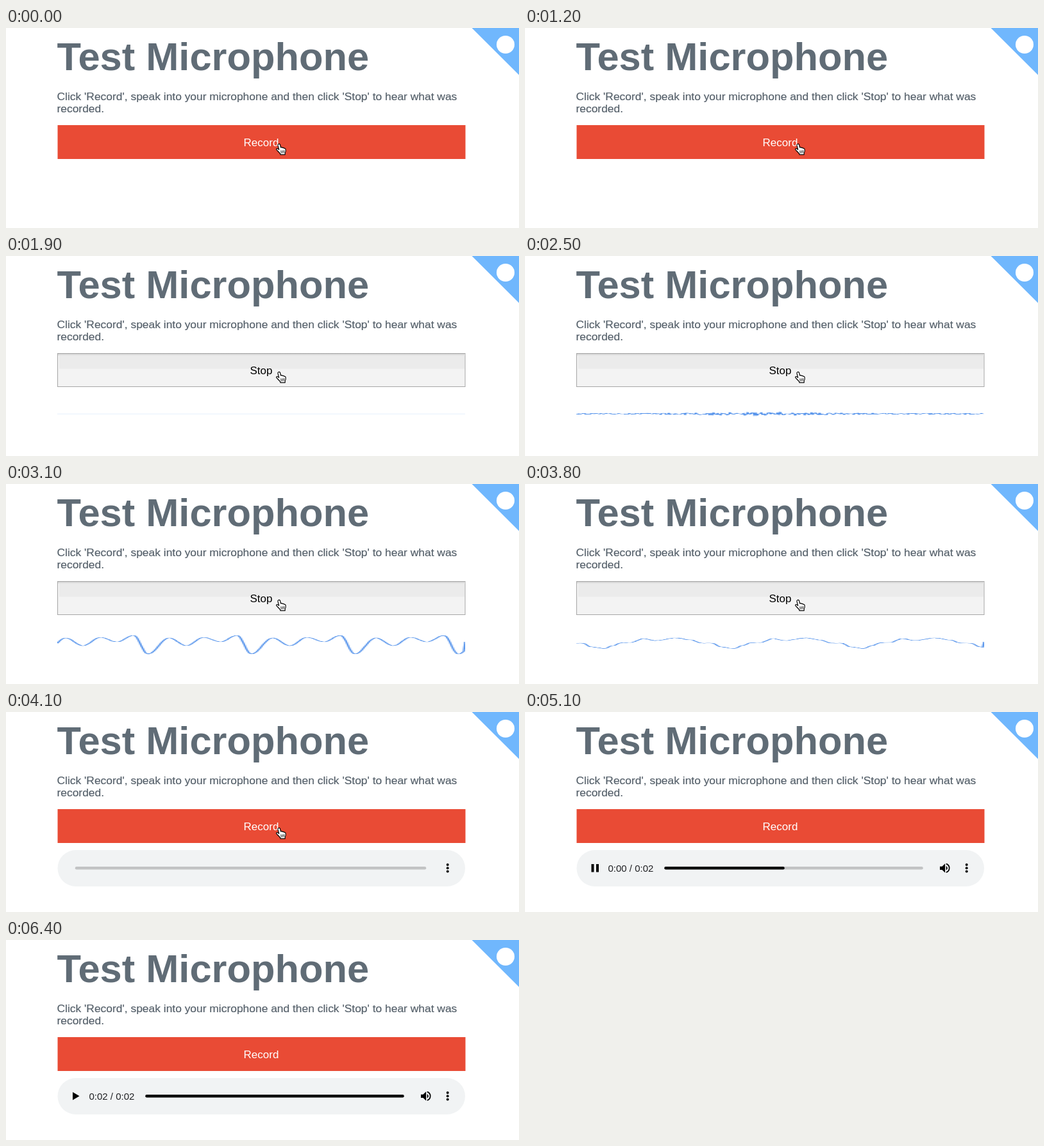
An HTML page with a canvas for the animation above (6500 ms loop, 800x313 px).

```html
<!DOCTYPE html>
<html lang="en">
<head>
<meta charset="utf-8">
<title>Test Microphone</title>
<style>
  html, body { margin: 0; width: 100%; height: 100%; overflow: hidden; background: #fff; }
  svg, canvas { position: absolute; }
  svg { left: 0; top: 0; }
  canvas { left: 80px; top: 219.5px; width: 636px; height: 54px; }
  text { font-family: "Liberation Sans", Arial, sans-serif; font-size: 17px; white-space: pre; }
  .heading { font-size: 61.4px; font-weight: bold; fill: #606c76; }
  .intro { font-size: 17.42px; fill: #56616b; stroke: #56616b; stroke-width: .2; }
  .track { stroke-width: 4.5; stroke-linecap: round; stroke: #c2c3c4; }
</style>
</head>
<body>
<svg width="800" height="313" viewBox="0 0 800 313">
  <defs>
    <linearGradient id="shade" x2="0" y2="1">
      <stop stop-color="#cfcfcf"/><stop offset="1" stop-color="#ebebeb"/>
    </linearGradient>
  </defs>
  <path d="M726.5 0H800V73.5Z" fill="#70b7fd"/>
  <circle cx="779" cy="26" r="14" fill="#fff"/>
  <text class="heading" x="79.5" y="66">Test Microphone</text>
  <text class="intro" x="79.5" y="113">Click 'Record', speak into your microphone and then click 'Stop' to hear what was</text>
  <text class="intro" x="79.5" y="132">recorded.</text>

  <g id="record">
    <rect x="80.5" y="152" width="636" height="53" fill="#e94b35"/>
    <text x="398" y="185" text-anchor="middle" fill="#fff">Record</text>
  </g>
  <g id="stop">
    <rect x="80.5" y="152.5" width="635.5" height="52" fill="#f3f3f3" stroke="#a6a6a6"/>
    <rect x="83" y="153" width="632" height="23.5" fill="#ebebeb"/>
    <rect x="81" y="153" width="634.5" height="3" fill="url(#shade)"/>
    <text x="398" y="185" text-anchor="middle" fill="#000">Stop</text>
  </g>

  <g id="player">
    <rect x="80.5" y="216" width="635.5" height="57" rx="28.5" fill="#f1f3f4"/>
    <g id="dots"><circle cx="688.7" cy="239" r="2"/><circle cx="688.7" cy="244.3" r="2"/><circle cx="688.7" cy="249.6" r="2"/></g>
    <path id="emptyTrack" class="track" d="M110 244.3H653"/>
    <g id="controls">
      <path id="playIcon" d="M104 238V250.5L114.5 244.3Z"/>
      <path id="pauseIcon" d="M103.5 238h4v12.5h-4zM111 238h4v12.5h-4z"/>
      <text id="clock" x="129.5" y="249.5" style="font-size:15px" fill="#202124"></text>
      <path class="track" d="M219.5 244.3H618.5"/>
      <path id="progress" class="track" style="stroke:#0c0c0c"/>
      <path d="M647 241.7v5.4h3.5l4.6 4.4v-14.2l-4.6 4.4z"/>
      <path d="M656.7 240.9a3.8 3.8 0 0 1 0 6.8z"/>
      <path d="M656.7 237.6a7 7 0 0 1 0 13.4" fill="none" stroke="#000" stroke-width="1.7"/>
    </g>
  </g>

  <g id="cursor" transform="translate(420.5 180.5)" stroke-linejoin="round" stroke-linecap="round">
    <path id="hand" fill="#fff" stroke="#000" stroke-width="1.2"
      d="M4.4 1.2C5.6 .5 6.8 1.2 7.1 2.4L8 6.5C9 5.7 10.3 6 10.6 7.1C11.7 6.4 12.9 6.8 13.2 7.9C14.3 7.5 15.4 8.1 15.6 9.3C16 11.6 15.6 13.5 14.7 15V17.6H7.3V16.2C5.6 14.6 3.5 12.3 1.6 10.3C.4 8.8 1.9 7.6 3.3 8.4L5.2 9.9L3.5 3.2C3.3 2.3 3.6 1.6 4.4 1.2Z"/>
    <path d="M8.3 11.6L8.9 15M10.6 11.4L11.1 14.8M12.9 11.2L13.2 14.5" fill="none" stroke="#000" stroke-width=".9"/>
  </g>
</svg>
<canvas id="scope" width="300" height="150"></canvas>

<script>
const LOOP = 6500, FRAME = 100;
const RECORD_START = 1900, RECORD_END = 4100, PLAY_END = 6300;
const $ = id => document.getElementById(id);
const show = (id, on) => $(id).style.display = on ? "" : "none";
const ctx = $("scope").getContext("2d");

// One voice period as [x, offset below the centre line], in stage pixels.
const vowel = { at: 60, points: [[0, 19], [33, -6], [60, 6], [87, -7], [113, 0], [139, -10], [161.3, 19]] };
const hum = {
  at: 124,
  points: [[0, 10.5], [13, 6], [26, 1.5], [41, 1], [61, -5], [79, -2], [112, -6], [134, -3], [152, 2], [167, 2], [182, 8], [202, 10.5]]
};
// Loudness per frame; negative values are unvoiced noise.
const loudness = [0, .1, .7, 1.4, 1.2, .5, -1, -.6, .15, .4, .9, 1.2, 1, 1, .95, .9, .8, 1.3, 1.1, 1, 1, 1.1];

function random(seed) {
  return () => {
    seed = (seed * 1664525 + 1013904223) % 4294967296;
    return seed / 4294967296;
  };
}

function sample({ at, points }, x) {
  const period = points[points.length - 1][0];
  const p = (((x - at) % period) + period) % period;
  const i = points.findIndex(([px]) => px > p);
  const [x0, y0] = points[i - 1], [x1, y1] = points[i];
  return y0 + (y1 - y0) * (1 - Math.cos(Math.PI * (p - x0) / (x1 - x0))) / 2;
}

function drawWave(t) {
  const level = loudness[(t - RECORD_START) / FRAME];
  const voice = t < 3600 ? vowel : hum;
  const shift = (t - (t < 3600 ? 3100 : 3800)) * .37;
  const rand = random(t);
  ctx.clearRect(0, 0, 300, 150);
  ctx.beginPath();
  for (let x = 0; x < 300; x++) {
    const noise = rand() * 2 - 1;
    const stageX = 80 + x * 2.12;
    const y = level < 0
      ? noise * level * (.9 + 1.5 * Math.exp(-(((stageX - 370) / 110) ** 2)))
      : level * (sample(voice, stageX + shift) + noise * .25);
    ctx.lineTo(x, 75 + y / .36);
  }
  ctx.lineTo(300, 75);
  ctx.strokeStyle = "#4a8cea";
  ctx.lineWidth = 1.4;
  ctx.stroke();
}

function drawPlayer(t) {
  const ended = t >= PLAY_END;
  const ticks = Math.floor((t - RECORD_END) / 250);
  const end = ended ? 621 : 217 + ticks * 47;
  const seconds = ended ? 2 : ticks > 4 ? 1 : 0;
  const loaded = t > RECORD_END;
  show("emptyTrack", !loaded);
  show("controls", loaded);
  show("playIcon", ended);
  show("pauseIcon", !ended);
  show("progress", ticks > 0);
  $("progress").setAttribute("d", `M219.5 244.3H${end - 2.5}`);
  $("clock").textContent = `0:0${seconds} / 0:02`;
}

function render(now) {
  const t = Math.floor(now % LOOP / FRAME) * FRAME;
  const recording = t >= RECORD_START && t < RECORD_END;
  const playing = t >= RECORD_END;
  show("stop", recording);
  show("record", !recording);
  show("scope", recording);
  show("player", playing);
  show("cursor", t < 4800);
  if (recording) drawWave(t);
  if (playing) drawPlayer(t);
}

const start = performance.now();
function tick() {
  render(performance.now() - start);
  requestAnimationFrame(tick);
}
tick();
</script>
</body>
</html>
```
